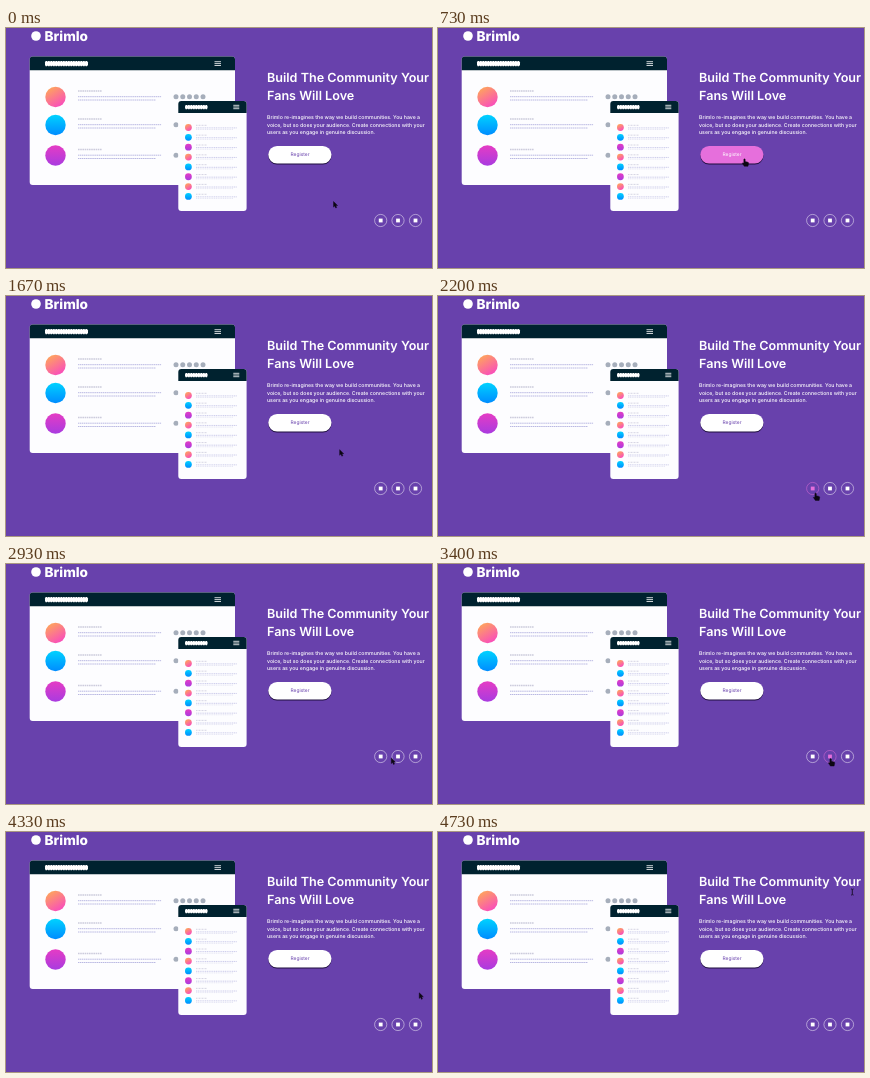
An HTML page for the animation above (4.79 s loop, 426 by 240 pixels).

```html
<!DOCTYPE html>
<html lang="en">
<head>
<meta charset="utf-8">
<title>Landing page</title>
<style>
  html, body { margin: 0; width: 100%; height: 100%; overflow: hidden; background: #6841ac; }
  svg { display: block; width: 100vw; height: 100vh; }
  text { font-family: Inter, "Open Sans", sans-serif; fill: #fff; text-rendering: geometricPrecision; }
  .logo { font-size: 13.6px; font-weight: 800; }
  .title { font-size: 12.6px; font-weight: 600; }
  .copy { font-size: 5.2px; font-weight: 500; }
  .button rect { fill: #fff; filter: drop-shadow(.8px 1px .6px #1d0d3c); }
  .button text { font-size: 4.9px; fill: #6841ac; text-anchor: middle; }
  .button.hover rect { fill: #e66fdc; }
  .button.hover text { fill: #fff; }
  .social { color: #fff; }
  .social.hover { color: #e66fdc; }
  .social circle { fill: none; stroke: currentColor; stroke-width: .6; stroke-opacity: .8; }
  .social rect { fill: currentColor; }
  .cursor { fill: #0c0712; stroke: #0c0712; stroke-width: .4; stroke-linejoin: round; }
</style>
</head>
<body>
<svg viewBox="0 0 426 240">
  <defs>
    <linearGradient id="warm" x2=".6" y2="1"><stop stop-color="#ffb050"/><stop offset="1" stop-color="#f950b8"/></linearGradient>
    <linearGradient id="blue" x2="0" y2="1"><stop stop-color="#00d2ff"/><stop offset="1" stop-color="#008cff"/></linearGradient>
    <linearGradient id="pink" x2="0" y2="1"><stop stop-color="#e53cc4"/><stop offset="1" stop-color="#a93be0"/></linearGradient>
  </defs>
  <circle cx="30" cy="8" r="4.8" fill="#fff"/>
  <text class="logo" x="38.5" y="13">Brimlo</text>
  <g id="windows"></g>
  <text class="title"><tspan x="261" y="53.5">Build The Community Your</tspan><tspan x="261" y="71.5">Fans Will Love</tspan></text>
  <text class="copy">
    <tspan x="261" y="90.8">Brimlo re-imagines the way we build communities. You have a</tspan>
    <tspan x="261" y="98.5">voice, but so does your audience. Create connections with your</tspan>
    <tspan x="261" y="106.2">users as you engage in genuine discussion.</tspan>
  </text>
  <g class="button"><rect x="262.3" y="118" width="63.2" height="17.5" rx="8.75"/><text x="294" y="128.4">Register</text></g>
  <g id="socials"></g>
  <path class="cursor" id="cursor"/>
</svg>
<script>
const $ = id => document.getElementById(id);
const LOOP = 4790, STEP = 1000 / 15;
const fills = ['warm', 'blue', 'pink'];
const socialX = [374.7, 392, 409.5], socialY = 192.5;

const dot = (x, y, r, fill) => `<circle cx="${x}" cy="${y}" r="${r}" fill="${fill}"/>`;
const dashes = (x, y, w, h, color, dash) =>
  `<path d="M${x} ${y}h${w}" stroke="${color}" stroke-width="${h}" stroke-dasharray="${dash}"/>`;

function pane(x, y, w, h, bar, r) {
  return `<rect x="${x}" y="${y}" width="${w}" height="${h}" rx="${r}" fill="#fdfdff"/>
    <path d="M${x} ${y + bar}v${r - bar}q0 ${-r} ${r} ${-r}h${w - 2 * r}q${r} 0 ${r} ${r}v${bar - r}z" fill="#00222f"/>`;
}
function menu(x, y, w, gap) {
  return [0, 1, 2].map(i => `<path d="M${x} ${y + i * gap}h${w}" stroke="#fff" stroke-width=".8"/>`).join('');
}
// Placeholder title: a bar with a scalloped edge
function label(x, y, w, h) {
  return `<rect x="${x}" y="${y + .5}" width="${w}" height="${h - 1}" rx="1" fill="#fff"/>`
    + dashes(x + .6, y + h / 2, w - 1, h, '#fff', '1.5 1');
}

let art = pane(23.7, 28.5, 205.3, 128.5, 13.7, 3) + label(39, 33, 43, 5.2) + menu(208.5, 33.7, 6.5, 1.9);
[69, 97, 127.5].forEach((y, i) => {
  art += dot(49.5, y, 10.2, `url(#${fills[i]})`)
    + dashes(72, y - 6, 24, 1.6, '#cccbdc', '1.6 .6')
    + dashes(72, y - .3, 83.5, 1, '#b9b8e2', '1.4 .5')
    + dashes(72, y + 3, 78, 1, '#b9b8e2', '1.4 .5');
  for (let j = 0; j < 5; j++) art += dot(170 + j * 6.75, y - .2, 2.5, '#a6aebb');
});
art += pane(172.3, 73, 68.3, 110, 12, 3) + label(179, 77, 22.5, 4.2) + menu(227.3, 77.3, 6, 1.7);
for (let i = 0; i < 8; i++) {
  const y = 99.5 + i * 9.85;
  art += dot(182.4, y, 3.4, `url(#${fills[i % 3]})`)
    + dashes(190, y - 2.2, 11, .8, '#cccbdc', '1 .5')
    + dashes(190, y + .4, 41, .7, '#b9b8e2', '1.2 .6')
    + dashes(190, y + 2, 37, .5, '#cfcee8', '1.2 .6');
}
$('windows').innerHTML = art;
$('socials').innerHTML = socialX.map(x => `<g class="social"><circle cx="${x}" cy="${socialY}" r="6.1"/>
  <rect x="${x - 1.9}" y="${socialY - 1.9}" width="3.8" height="3.8"/></g>`).join('');

const shapes = {
  arrow: 'M0 0v5.6l1.3-1.2 .9 2.1 1-.4-.9-2.1h1.8z',
  hand: 'M-.7 .5q.7-1 1.4 0v2.2l2.8.7q.8.3.6 1.3l-.6 2.8h-3.7l-2-3q.2-1 1.5 0z',
  text: 'M-1.3-3q1 0 1.3.5.3-.5 1.3-.5M0-2.5v5M-1.3 3q1 0 1.3-.5.3.5 1.3.5'
};

// Pointer path: time, x, y
const path = [
  [0, 327.5, 173.5], [180, 326, 170], [600, 307.5, 132], [730, 306.5, 130.8], [1200, 304.4, 127],
  [1450, 306, 128], [1950, 375, 192], [2200, 377.6, 197], [2700, 380.5, 195.5], [2930, 385.3, 194],
  [3150, 391, 193], [3500, 393, 195], [3800, 411, 194.5], [3930, 412.2, 194.6], [4200, 413, 194],
  [4600, 414, 66], [4730, 414.3, 60], [LOOP, 414.3, 60]
];
function pointer(t) {
  const i = path.findIndex(p => p[0] > t);
  const [a, b] = [path[i - 1], path[i]];
  const u = (t - a[0]) / (b[0] - a[0]), e = u * u * (3 - 2 * u);
  return [a[1] + (b[1] - a[1]) * e, a[2] + (b[2] - a[2]) * e];
}

const button = document.querySelector('.button');
const socials = [...document.querySelectorAll('.social')];
const cursor = $('cursor');
const inside = (x, y, l, t, r, b) => x > l && x < r && y > t && y < b;

function draw() {
  const now = performance.now() % LOOP;
  const [x, y] = pointer(Math.floor((now + 4) / STEP) * STEP);
  const onButton = inside(x, y, 262, 118, 326, 136);
  const onSocial = socialX.map(cx => Math.hypot(x - cx, y - socialY) < 6.3);
  const onText = inside(x, y, 261, 40, 426, 76) || inside(x, y, 261, 85, 420, 109);
  button.classList.toggle('hover', onButton);
  socials.forEach((s, i) => s.classList.toggle('hover', onSocial[i]));
  const kind = onButton || onSocial.includes(true) ? 'hand' : onText ? 'text' : 'arrow';
  cursor.setAttribute('d', shapes[kind]);
  cursor.setAttribute('transform', `translate(${x} ${y})`);
  cursor.style.fill = kind === 'text' ? 'none' : '';
  cursor.style.strokeWidth = kind === 'text' ? .8 : '';
  requestAnimationFrame(draw);
}
draw();
</script>
</body>
</html>
```
